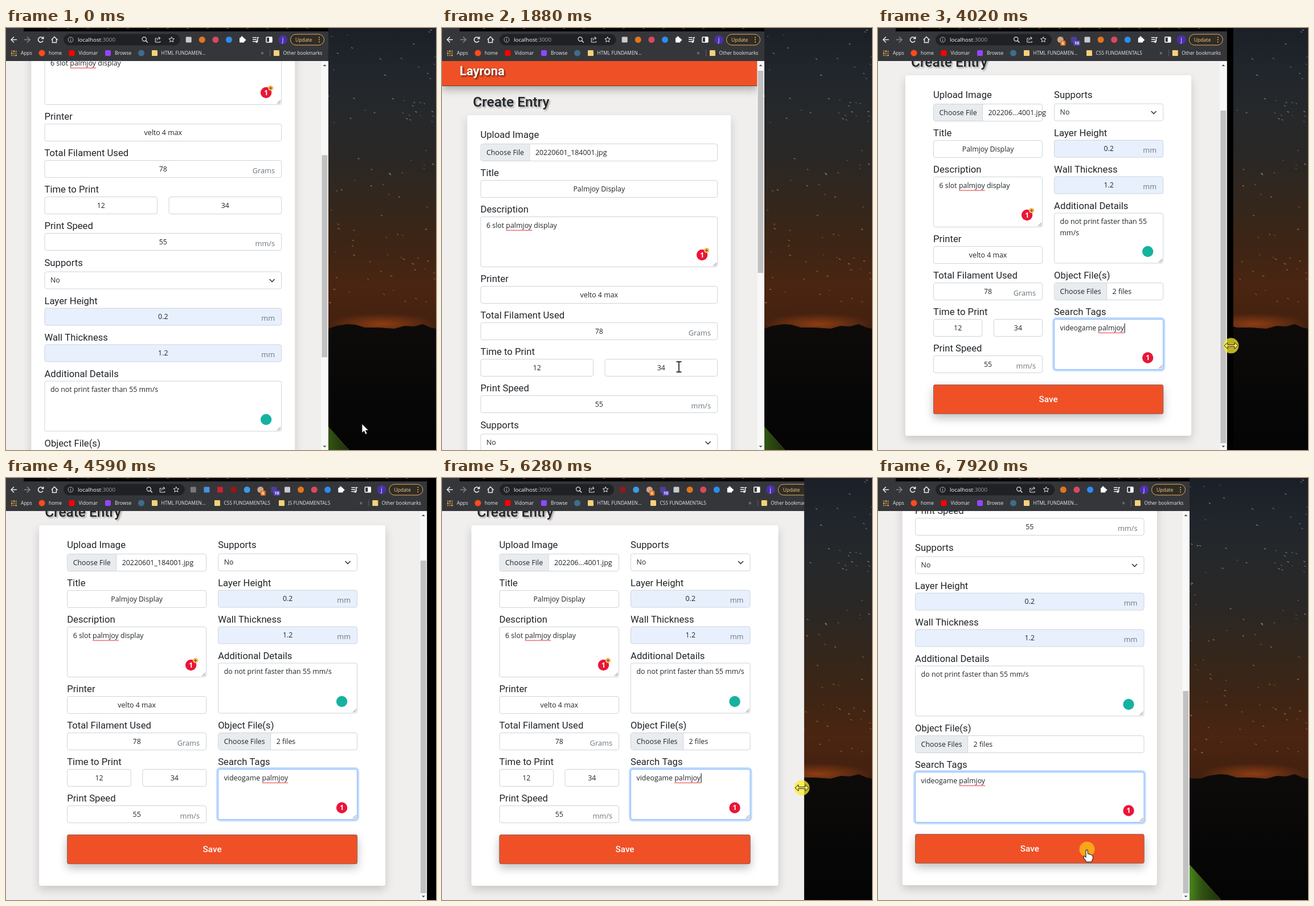
An HTML page with a canvas for the animation above (7.99 s loop, 755 by 741 pixels).

```html
<!DOCTYPE html>
<html lang="en">
<head>
<meta charset="utf-8">
<title>Create Entry</title>
<style>
html, body { margin: 0; width: 100%; height: 100%; overflow: hidden; background: #000; }
canvas { display: block; }
</style>
</head>
<body>
<canvas id="stage" width="755" height="741"></canvas>
<script>
const SW = 755, SH = 741, LOOP = 7990, TOP = 58, BREAK = 576;
const ctx = document.getElementById('stage').getContext('2d');
let g = ctx;
const BODY = '"Open Sans", "Noto Sans", sans-serif';
const HEAD = 'Roboto, "Open Sans", sans-serif';
const INK = '#212529', MUTED = '#6c757d', LINE = '#ced4da', ORANGE = '#f05026', PALE = '#e8eaed';

// [time, value, ...] tracks
const widthKeys = [[3810, 566], [4590, 739], [4790, 800], [4930, 806], [5460, 916], [5670, 916],
  [6280, 657], [6410, 632], [6900, 558], [7220, 547]];
const scrollKeys = [[70, 285], [780, 0], [1900, 0], [2600, 575], [6300, 575], [6301, 70], [7290, 70], [7650, 575]];
const mouseKeys = [[70, 625, 695], [420, 416, 595], [1950, 416, 595], [2640, 545, 590], [2850, 594, 573],
  [3050, 598, 566], [3410, 562, 560], [3810, 562, 560], [4590, 776, 552], [5460, 930, 548], [5670, 930, 546],
  [6280, 632, 544], [6410, 614, 544], [6900, 549, 544], [7220, 543, 544], [7290, 520, 560], [7650, 367, 652]];

function track(keys, t, col = 1, smooth = false) {
  if (t <= keys[0][0]) return keys[0][col];
  for (let i = 1; i < keys.length; i++) {
    const a = keys[i - 1], b = keys[i];
    if (t > b[0]) continue;
    let p = (t - a[0]) / (b[0] - a[0]);
    if (smooth) p = p * p * (3 - 2 * p);
    return a[col] + (b[col] - a[col]) * p;
  }
  return keys[keys.length - 1][col];
}

function rect(x, y, w, h, fill) { g.fillStyle = fill; g.fillRect(x, y, w, h); }
function box(x, y, w, h, r, fill, stroke, lw = 1) {
  g.beginPath();
  g.roundRect(x, y, w, h, r);
  if (fill) { g.fillStyle = fill; g.fill(); }
  if (stroke) { g.strokeStyle = stroke; g.lineWidth = lw; g.stroke(); }
}
function dot(x, y, r, fill, stroke, lw = 1.4) {
  g.beginPath();
  g.arc(x, y, r, 0, 7);
  if (fill) { g.fillStyle = fill; g.fill(); }
  if (stroke) { g.strokeStyle = stroke; g.lineWidth = lw; g.stroke(); }
}
function path(pts, x, y, fill, stroke, lw = 1.5) {
  g.beginPath();
  for (let i = 0; i < pts.length; i += 2) g.lineTo(x + pts[i], y + pts[i + 1]);
  if (fill) { g.closePath(); g.fillStyle = fill; g.fill(); }
  if (stroke) { g.strokeStyle = stroke; g.lineWidth = lw; g.stroke(); }
}
// y is the middle of the capitals
function text(s, x, y, size, color = INK, align = 'left', face = BODY, weight = 400) {
  g.font = `${weight} ${size}px ${face}`;
  g.textAlign = align;
  g.fillStyle = color;
  g.fillText(s, x, y + size * 0.35);
  return g.measureText(s).width;
}
function shadow(color, blur, dx, dy, draw) {
  g.save();
  g.shadowColor = color; g.shadowBlur = blur; g.shadowOffsetX = dx; g.shadowOffsetY = dy;
  draw();
  g.restore();
}

// ---- desktop ----
function makeDesktop() {
  const c = document.createElement('canvas');
  c.width = SW; c.height = SH;
  g = c.getContext('2d');
  const sky = g.createLinearGradient(0, 0, 0, 530);
  ['#1b2028', '#21262c', '#26282a', '#2a2725', '#33271d', '#3d2515', '#4a2511', '#42200f']
    .forEach((col, i, a) => sky.addColorStop(i / (a.length - 1), col));
  rect(0, 0, SW, SH, sky);
  g.save();
  g.translate(660, 520); g.scale(1, 0.2);
  const glow = g.createRadialGradient(0, 0, 0, 0, 0, 95);
  glow.addColorStop(0, 'rgba(165,70,20,.75)');
  glow.addColorStop(1, 'rgba(165,70,20,0)');
  dot(0, 0, 95, glow);
  g.restore();
  let seed = 41;
  const rnd = () => (seed = seed * 16807 % 2147483647) / 2147483647;
  for (let i = 0; i < 110; i++) {
    const x = 540 + rnd() * 215, y = rnd() * 490, a = 0.25 + rnd() * 0.55;
    path([0, 0, 3, 1.6], x, y, null, y > 260 ? `rgba(235,150,95,${a})` : `rgba(185,180,175,${a})`, 1.1);
  }
  const land = g.createLinearGradient(0, 520, 0, SH);
  land.addColorStop(0, '#0d0b0a');
  land.addColorStop(1, '#040404');
  path([540, 527, 566, 528, 580, 523, 600, 520, 614, 521, 630, 526, 655, 526, 682, 528, 700, 523, 716, 524,
    732, 520, 745, 526, 755, 528, 755, 741, 540, 741], 0, 0, land);
  const tent = g.createLinearGradient(545, 0, 605, 0);
  tent.addColorStop(0, '#4a8a1c');
  tent.addColorStop(0.4, '#2f5212');
  tent.addColorStop(1, '#1d2a0b');
  path([540, 671, 602, 741, 540, 741], 0, 0, tent, '#4d4a20', 1);
  g = ctx;
  return c;
}
const desktop = makeDesktop();

// ---- browser chrome ----
// nearest to the right edge first; s = square, c = circle
const extensions = ['c#2b8df2', 'c#d9485f', 'c#e2761b', 's#c9cacc', 's#4d3f99', 'c#c9a48a', 'c#3a9be8', 's#8f1a1a', 's#cf2030',
  's#4a90e2', 's#77797c', 's#d8404a', 's#a9abad', 's#8fb43e', 's#bdbfc1', 'c#15b39a', 's#dcdee0', 's#d3222a'];
const folders = [[261, 'HTML FUNDAMEN...', 353], [371, 'CSS FUNDAMENTALS', 467],
  [484, 'JS FUNDAMENTALS', 573], [590, 'starting-an-exercise...', 687]];

function folder(x) {
  box(x - 5, 39, 10, 10, 1, '#f5d27a');
  rect(x + 3, 39, 2, 3, '#e2b650');
}
function bookmark(x, label, color, round) {
  if (round) dot(x, 44, 5.5, color); else box(x - 5, 39, 10, 10, 2, color);
  if (label) text(label, x + 12, 44, 8.5, PALE);
}
function drawChrome(w) {
  rect(0, 0, w, TOP, '#35363a');
  rect(31, 0, w - 31, 6, '#060607');
  for (let x = 72; x < w - 30; x += 35) rect(x, 0, 4, 1, x % 2 ? '#41624a' : '#6a4a4a');

  path([5, -5, 0, 0, 5, 5], 9, 20.5, null, PALE); path([0, 0, 10, 0], 9, 20.5, null, PALE);
  path([-5, -5, 0, 0, -5, 5], 42, 20.5, null, '#85878b'); path([0, 0, -10, 0], 42, 20.5, null, '#85878b');
  g.beginPath(); g.arc(61, 20.5, 4.5, 0.5, 5.6); g.strokeStyle = PALE; g.lineWidth = 1.6; g.stroke();
  path([0, 0, 5, 0, 5, -5], 61.5, 19.5, PALE);
  path([-5, 0, 0, -5, 5, 0, 3.5, 0, 3.5, 5, -3.5, 5, -3.5, 0, -5, 0], 85, 20.5, null, PALE);

  const plus = w - 174.5, step = 23.6;
  const n = Math.min(extensions.length, Math.floor((plus + 0.5 - 318) / step + 0.02) + 1);
  const star = plus - step * (n - 1) - 30;
  box(101, 10.5, star - 86, 20, 10, '#202124');
  dot(113.5, 20.5, 4.5, null, '#b8babd', 1);
  rect(113, 20, 1, 3, '#b8babd'); rect(113, 18, 1, 1, '#b8babd');
  const host = text('localhost', 126, 20.5, 9.8, '#fff');
  text(':3000', 126 + host, 20.5, 9.8, '#9aa0a6');
  dot(star - 48, 19.5, 3.6, null, PALE, 1.2); path([0, 0, 3.5, 3.5], star - 45.5, 22, null, PALE);
  path([-2, -2, -4.5, -2, -4.5, 5, 4, 5, 4, 3], star - 24, 20, null, PALE, 1);
  path([-2, 2, 0, -2, 4, -2, 1.5, -4.5, 4, -2, 1.5, 0.5], star - 24, 20, null, PALE, 1);
  const rays = [];
  for (let i = 0; i < 11; i++) {
    const r = i % 2 ? 2.3 : 5, a = -Math.PI / 2 + i * Math.PI / 5;
    rays.push(r * Math.cos(a), r * Math.sin(a));
  }
  path(rays, star, 20.5, null, PALE, 1);

  for (let i = 0; i < n; i++) {
    const x = plus - step * i, color = extensions[i].slice(1);
    if (extensions[i][0] === 'c') dot(x, 20.5, 5.5, color); else box(x - 5, 15.5, 10, 10, 1.5, color);
    if (i === 4) { box(x - 1, 22, 12, 9, 2, '#5b45b5'); text('10', x + 5, 26.5, 7, '#fff', 'center', BODY, 700); }
    if (i === 5) { box(x, 22, 9, 9, 2, '#e87722'); text('6', x + 4.5, 26.5, 7, '#fff', 'center', BODY, 700); }
  }
  const px = w - 151;
  box(px - 5, 17, 8.5, 8.5, 1, '#fff'); dot(px - 0.8, 16.5, 2, '#fff'); dot(px + 4, 21, 2, '#fff');
  [16, 19.5, 23].forEach((y, i) => rect(w - 133, y, i === 2 ? 5 : 7, 1.4, '#fff'));
  rect(w - 125, 16, 1.4, 8, '#fff'); rect(w - 125, 16, 3, 1.4, '#fff'); dot(w - 126, 24, 1.9, '#fff');
  box(w - 109, 16, 10, 9, 1, null, '#fff', 1.5); rect(w - 104, 16, 5, 9, '#fff');
  dot(w - 80, 20.5, 8, '#4b2fa8');
  text('j', w - 80, 20.5, 10, '#fff', 'center');
  box(w - 66.5, 11, 59, 19, 9.5, '#302c26', '#e0b060', 1);
  text('Update', w - 58, 20.5, 8.6, '#f5cf8a');
  [16.5, 20.5, 24.5].forEach(y => dot(w - 16, y, 1, '#f0bf6a'));

  const hues = ['#e8533f', '#f2b63c', '#58a55c'];
  for (let i = 0; i < 9; i++) rect(9 + (i % 3) * 3.7, 39.5 + Math.floor(i / 3) * 3.7, 2.4, 2.4, hues[(i + Math.floor(i / 3)) % 3]);
  text('Apps', 26, 44, 8.5, PALE);
  bookmark(63, 'home', '#ff4a1c', true);
  bookmark(115.5, 'Vidomar', '#f00');
  bookmark(179, 'Browse', '#9147ff');
  bookmark(237.5, '', '#3d6e88', true);
  folders.forEach(([x, label, end], i) => {
    if (end > w - 128) return;
    if (i < 3) folder(x); else dot(x, 44, 5.5, '#3d6e88');
    text(label, x + 11.5, 44, 8.4, PALE);
  });
  text('»', w - 116, 43, 10, '#a0a3a7', 'center');
  rect(w - 103, 38, 1, 12, '#5f6165');
  folder(w - 91);
  text('Other bookmarks', w - 79.5, 44, 8.4, PALE);
}

// ---- form ----
function field(x, y, w, h = 30, fill = '#fff') { box(x + 0.5, y + 0.5, w - 1, h, 3.5, fill, LINE); }
function label(s, x, y) { text(s, x, y, 16.7, INK, 'left', HEAD); }
function entry(x, y, w, value, unit, fill) {
  field(x, y, w, 30, fill);
  text(value, x + w / 2, y + 15.5, 12.4, INK, 'center');
  if (unit) text(unit, x + w - 12, y + 18.5, 12.8, MUTED, 'right');
}
function file(x, y, w, button, bw, name, short) {
  field(x, y, w);
  box(x + 1, y + 1, bw - 1, 29, [3, 0, 0, 3], '#e9ecef');
  rect(x + bw, y + 1, 1, 29, LINE);
  text(button, x + 10.5, y + 15.5, 12.4);
  g.font = `12.4px ${BODY}`;
  text(short && g.measureText(name).width > w - bw - 18 ? short : name, x + bw + 10.5, y + 15.5, 12.4);
}
function area(x, y, w, value, flagged, focus, caret) {
  if (focus) box(x - 1, y - 1, w + 2, 91, 5, null, '#c2dbfe', 4);
  box(x + 0.5, y + 0.5, w - 1, 88, 3.5, '#fff', focus ? '#86b7fe' : LINE);
  path([0, 0, 6, -6], x + w - 8, y + 87, null, '#777', 1);
  path([0, 0, 3, -3], x + w - 5, y + 87, null, '#777', 1);
  const lines = [''];
  g.font = `12.4px ${BODY}`;
  for (const word of value.split(' ')) {
    const last = lines.length - 1, next = (lines[last] + ' ' + word).trim();
    if (g.measureText(next).width > w - 19) lines.push(word); else lines[last] = next;
  }
  lines.forEach((s, i) => {
    const ly = y + 15.5 + i * 20, tw = text(s, x + 10.5, ly, 12.4), at = flagged ? s.indexOf(flagged) : -1;
    if (at >= 0) rect(x + 10.5 + g.measureText(s.slice(0, at)).width, ly + 8, g.measureText(flagged).width, 1.6, '#f0787c');
    if (caret && i === lines.length - 1) rect(x + 11 + tw, ly - 8, 1, 17, '#000');
  });
}
function badge(x, y, extra) {
  dot(x, y, 9.7, '#ea1537');
  text('1', x, y, 12, '#fff', 'center', BODY, 700);
  if (extra) {
    dot(x + 8, y - 8, 4.6, '#f3b95f');
    rect(x + 5.5, y - 8.5, 5, 1, '#6b3d10'); rect(x + 7.5, y - 10.5, 1, 5, '#6b3d10');
  }
}

function drawPage(w, scroll, t) {
  const vw = w - 12.5, two = w > BREAK;
  const cx = vw * 0.08, cw = vw * 0.8365, pad = two ? 49 : cw * 0.05;
  const x = cx + pad, full = cw - pad * 2, col = two ? (full - 20) / 2 : full;
  const x2 = two ? x + col + 20 : x, up = two ? 510 : 0, low = two ? 504 : 0;
  const focus = t >= 3810, caret = focus && Math.floor((t - 3810) / 530) % 2 === 0;

  g.save();
  g.beginPath(); g.rect(0, TOP, w, SH - TOP); g.clip();
  rect(0, TOP, w, SH, '#f1efee');
  g.translate(0, -scroll);

  shadow('rgba(0,0,0,.3)', 14, 0, 6, () => rect(0, TOP - 10, vw, 54, ORANGE));
  rect(0, 101, vw, 1, '#6b3a30');
  shadow('rgba(0,0,0,.6)', 3, 2, 2, () => text('Layrona', 31, 75, 22, '#fff', 'left', HEAD, 700));
  shadow('rgba(0,0,0,.35)', 3, 2, 2, () => text('Create Entry', cx + 10, 129, 24.4, INK, 'left', HEAD, 500));
  shadow('rgba(0,0,0,.17)', 16, 0, 7, () => box(cx, 153, cw, 1137 - low, 4, '#fff'));

  label('Upload Image', x, 187);
  file(x, 203, col, 'Choose File', 86, '20220601_184001.jpg', '202206...4001.jpg');
  label('Title', x, 254);
  entry(x, 267, col, 'Palmjoy Display');
  label('Description', x, 318);
  area(x, 331, col, '6 slot palmjoy display', 'palmjoy');
  badge(x + col - 27.5, 398.5, true);
  label('Printer', x, 440);
  entry(x, 453, col, 'velto 4 max');
  label('Total Filament Used', x, 504);
  entry(x, 517, col, '78', 'Grams');
  label('Time to Print', x, 568);
  const half = (col - 19.5) / 2;
  entry(x, 581, half, '12');
  entry(x + half + 19.5, 581, half, '34');
  label('Print Speed', x, 632);
  entry(x, 645, col, '55', 'mm/s');

  g.save();
  g.translate(0, -up);
  label('Supports', x2, 697);
  field(x2, 712.5, col);
  text('No', x2 + 10.5, 728, 12.4);
  path([-4.5, -2, 0, 2.5, 4.5, -2], x2 + col - 17, 728, null, '#343a40', 1.6);
  label('Layer Height', x2, 764);
  entry(x2, 776.5, col, '0.2', 'mm', '#e8f0fe');
  label('Wall Thickness', x2, 828);
  entry(x2, 840.5, col, '1.2', 'mm', '#e8f0fe');
  label('Additional Details', x2, 892);
  area(x2, 904.5, col, 'do not print faster than 55 mm/s');
  dot(x2 + col - 27.5, 972.5, 9.7, '#15b39f');
  label('Object File(s)', x2, 1014);
  file(x2, 1027, col, 'Choose Files', 92, '2 files');
  label('Search Tags', x2, 1078);
  area(x2, 1091, col, 'videogame palmjoy', 'palmjoy', focus, caret);
  badge(x2 + col - 27.5, 1159);
  g.restore();

  const sy = 1200 - low;
  shadow('rgba(0,0,0,.25)', 16, 0, 7, () => box(x, sy, full, 52, 3.5, ORANGE));
  box(x + 0.5, sy + 0.5, full - 1, 51, 3.5, null, '#8a6a66');
  text('Save', x + full / 2, sy + 26, 15.3, '#fff', 'center', HEAD, 500);
  g.restore();

  // scrollbar
  rect(vw, TOP, w - vw, SH - TOP, '#f8f8f8');
  const len = two ? 584 : 355, range = two ? 70 : 575;
  const hover = t > 2560 && t < 2780;
  rect(vw + 1, 75 + (654 - len) * scroll / range, 10, len, hover ? '#a8a8a8' : '#c1c1c1');
  path([-3, 1.5, 0, -1.5, 3, 1.5], vw + 6, 65.5, '#505050');
  path([-3, -1.5, 0, 1.5, 3, -1.5], vw + 6, 735, '#505050');
}

// ---- pointers ----
function arrow(x, y) {
  path([0, 0, 0, 16, 3.7, 12.6, 6.3, 18.5, 9, 17.3, 6.5, 11.6, 11.5, 11.6], x, y, '#fff', '#111', 0.8);
}
function beam(x, y) {
  for (const [color, lw] of [['#fff', 3], ['#111', 1.6]]) {
    path([0, -9, 0, 9], x, y, null, color, lw);
    path([-4.5, -9, 4.5, -9], x, y, null, color, lw);
    path([-4.5, 9, 4.5, 9], x, y, null, color, lw);
  }
}
function resizer(x, y, pressed) {
  if (pressed) dot(x, y, 13.5, 'rgba(250,235,50,.75)');
  path([-12, 0, -6, -5.5, -6, -1.5, 6, -1.5, 6, -5.5, 12, 0, 6, 5.5, 6, 1.5, -6, 1.5, -6, 5.5, -12, 0],
    x, y, pressed ? '#f4e65a' : '#fff', '#222', 1);
}
function hand(x, y, pressed) {
  if (pressed) dot(x, y, 13.5, '#f9a51a');
  path([-2, 3, -1, 1, 1, 1.5, 1.5, 8, 4, 8, 4.5, 9, 7, 9, 8, 10, 10, 11, 10.5, 16, 8, 22, -1, 22, -6, 15, -6, 12, -4, 12, -2, 14],
    x, y, '#fff', '#222', 1.1);
}

function draw(t) {
  const w = track(widthKeys, t), two = w > BREAK;
  const scroll = Math.min(track(scrollKeys, t, 1, true), two ? 70 : 575);
  const mx = track(mouseKeys, t), my = track(mouseKeys, t, 2);
  const drag = t >= 3810 && t < 7220, edge = drag ? mx + 4 : w;

  g.drawImage(desktop, 0, 0);
  if (edge > w) rect(w, 0, edge - w, SH, '#000');
  g.save();
  g.beginPath(); g.rect(0, 0, Math.min(w, edge), SH); g.clip();
  drawPage(w, scroll, t);
  drawChrome(w);
  g.restore();

  if (drag || (t > 3380 && t < 3810)) resizer(mx, my, drag);
  else if (t > 7500) hand(mx, my, t >= 7920);
  else if (mx < 484 && t < 2700) beam(mx, my);
  else arrow(mx, my);
}

function tick() {
  draw(performance.now() % LOOP);
  requestAnimationFrame(tick);
}
tick();
</script>
</body>
</html>
```
